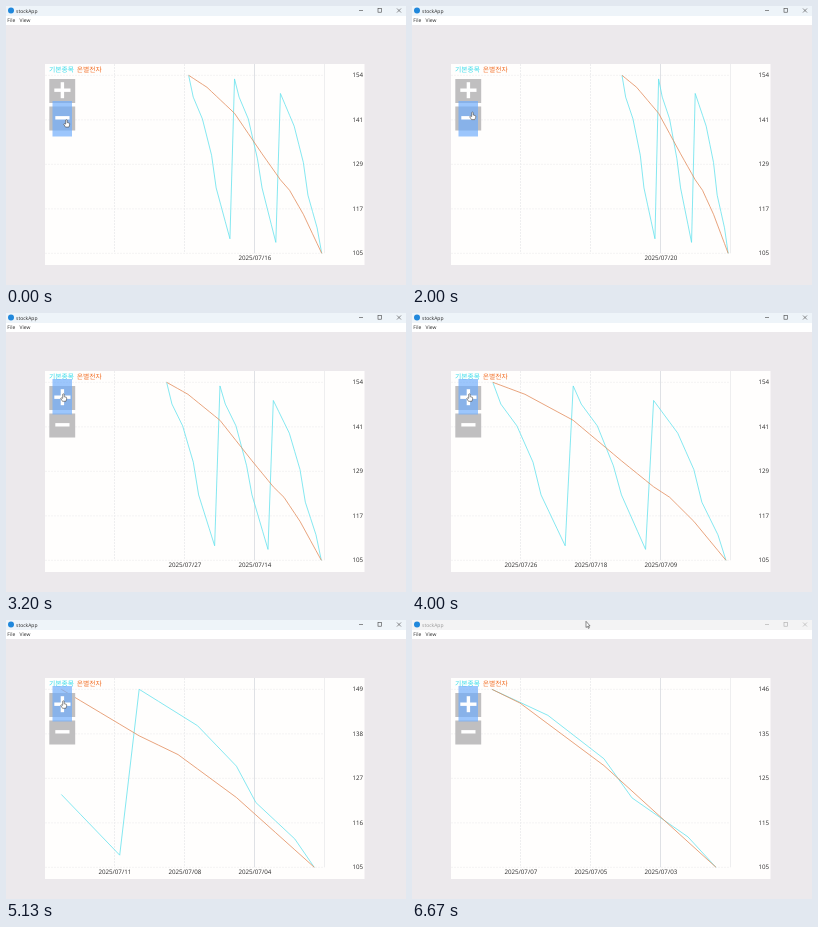
Animation of 400x279 px, one loop 6.8 s. Source, as an HTML page with a canvas:

```html
<!DOCTYPE html>
<html lang="ko">
<head>
<meta charset="utf-8">
<title>stockApp</title>
<style>
  html, body { margin: 0; width: 100%; height: 100%; overflow: hidden; background: #ece9ec; }
  canvas { display: block; }
</style>
</head>
<body>
<canvas id="stage" width="400" height="279"></canvas>
<script>
const ctx = document.getElementById('stage').getContext('2d');
ctx.textRendering = 'geometricPrecision';
const LOOP = 6800, DAYS = 30;
const LATIN = '"Open Sans", "Noto Sans", sans-serif';
const HANGUL = '"Noto Sans CJK KR", "Noto Sans CJK", sans-serif';
const CYAN = '#66e2ee', ORANGE = '#e38d5e', INK = '#2a2a2a';
const plot = { left: 39, right: 318, top: 69.3, bottom: 247.3, width: 279 };

const lerp = (a, b, k) => a + (b - a) * k;
const progress = (t, from, to) => Math.min(1, Math.max(0, (t - from) / (to - from)));

// One value per day, newest (July 1) first, straight between turning points [day, value]
function series(turns) {
  return Array.from({ length: DAYS }, (_, day) => {
    const next = Math.max(1, turns.findIndex(([d]) => d >= day));
    const [d0, v0] = turns[next - 1], [d1, v1] = turns[next];
    return lerp(v0, v1, (day - d0) / (d1 - d0));
  });
}
const prices = series([[0, 105], [1, 112], [3, 121], [4, 130], [6, 140], [9, 149],
  [10, 108], [13, 123], [14, 131], [16, 142], [18, 148], [19, 153],
  [20, 109], [23, 123], [24, 132], [26, 142], [28, 148], [29, 154]]);
const rival = series([[0, 0], [4, 39], [7, 63], [9, 73.5], [13, 99.5], [19, 140], [25, 166], [29, 178]]);

// Bursts of evenly spaced clicks on a zoom button, each ending at a number of visible days
const bursts = [
  { start: 200, gap: 234, clicks: 3, days: 76.2 },
  { start: 2330, gap: 217, clicks: 5, days: 52.3 },
  { start: 3330, gap: 180, clicks: 4, days: 34.7 },
  { start: 4130, gap: 400, clicks: 2, days: 26.6 },
  { start: 4800, gap: 165, clicks: 3, days: 14.34 },
  { start: 5400, gap: 1, clicks: 1, days: 9.96 },
];

function visibleDays(t) {
  let days = 60.8;
  for (const b of bursts) {
    if (t < b.start) break;
    const done = Math.min(b.clicks, Math.floor((t - b.start) / b.gap) + 1);
    days = lerp(days, b.days, done / b.clicks);
  }
  return days;
}

function rect(x, y, w, h, color) {
  ctx.fillStyle = color;
  ctx.fillRect(x, y, w, h);
}

function path(points, color, width = 1, dash = []) {
  ctx.beginPath();
  points.forEach(([x, y]) => ctx.lineTo(x, y));
  ctx.strokeStyle = color;
  ctx.lineWidth = width;
  ctx.setLineDash(dash);
  ctx.stroke();
}

function text(str, x, y, size, color, align = 'left', family = LATIN) {
  ctx.font = `${size}px ${family}`;
  ctx.textAlign = align;
  ctx.fillStyle = color;
  ctx.fillText(str, x, y);
}

function drawWindow(active) {
  const ink = active ? '#444' : '#aaa';
  rect(0, 0, 400, 279, '#ece9ec');
  rect(0, 0, 400, 10, active ? '#eef4f9' : '#f3f3f4');
  rect(0, 10, 400, 9, '#fff');
  ctx.beginPath();
  ctx.arc(5, 4.6, 3, 0, 7);
  ctx.fillStyle = '#2088dc';
  ctx.fill();
  text('stockApp', 10, 6.5, 5, active ? INK : '#999');
  text('File', 1.3, 16.3, 5, INK);
  text('View', 13.6, 16.3, 5, INK);
  path([[353, 4.5], [357, 4.5]], ink, .6);
  ctx.strokeRect(372, 2.6, 3.6, 3.6);
  path([[391, 2.5], [395, 6.5]], ink, .6);
  path([[395, 2.5], [391, 6.5]], ink, .6);
}

function drawSeries(values, step, color) {
  const min = Math.min(...values), max = Math.max(...values);
  path(values.map((v, i) => [
    plot.right - step * (i + .5),
    lerp(plot.bottom, plot.top, (v - min) / (max - min))
  ]), color, .8);
}

function drawChart(days) {
  const step = plot.width / days, count = Math.floor(days);
  const shown = prices.slice(0, count);
  const min = Math.min(...shown), max = Math.max(...shown);

  rect(39, 58, 319.5, 201, '#fffefd');
  for (let k = 0; k < 5; k++) {
    const y = lerp(plot.bottom, plot.top, k / 4);
    path([[plot.left, y], [plot.right, y]], '#f1f1f1', .8, [2, 1]);
    text(Math.floor(lerp(min, max, k / 4)), 357, y + 2, 6.2, INK, 'right');
  }
  for (let k = 0; k < 4; k++) {
    const x = Math.floor(plot.right - k * plot.width / 4) + .5;
    path([[x, 58], [x, plot.bottom]], k === 1 ? '#dcdee3' : '#ececee', .9, k < 2 ? [] : [2, 1]);
    const day = Math.floor(k * count / 4);
    if (k && day < DAYS)
      text(`2025/07/${String(day + 1).padStart(2, '0')}`, x + .3, 254.4, 6.2, INK, 'center');
  }
  drawSeries(shown, step, CYAN);
  drawSeries(rival.slice(0, count), step, ORANGE);
  text('기본종목', 43, 65.8, 6.8, '#35dcea', 'left', HANGUL);
  text('온별전자', 70.8, 65.8, 6.8, '#f2732c', 'left', HANGUL);
}

function drawButtons(plusSelected) {
  rect(43.3, 73, 25.9, 24, '#c0bfc0');
  rect(43.3, 100.5, 25.9, 24, '#c0bfc0');
  rect(46.5, plusSelected ? 66 : 95, 19.5, 35.5, 'rgba(110, 173, 252, .68)');
  path([[48.3, 84.2], [64.5, 84.2]], '#fff', 3.4);
  path([[56.4, 76.2], [56.4, 92.2]], '#fff', 3.4);
  path([[49.3, 111.8], [63.5, 111.8]], '#fff', 3.4);
}

function drawCursor(x, y, hand) {
  const shape = new Path2D(hand
    ? 'M-.8-3.5Q0-4.3 .7-3.5V-1L2.8-.4Q3.4 0 3.1 1.5L2.4 3.6H-1L-2.8 .7Q-2.6-.2-.8 .6Z'
    : 'M-1.5-3V3.2L-.1 2 .9 4.1 1.8 3.7 .9 1.7H2.6Z');
  ctx.save();
  ctx.translate(x, y);
  ctx.fillStyle = '#fff';
  ctx.strokeStyle = '#444';
  ctx.lineWidth = .6;
  ctx.setLineDash([]);
  ctx.fill(shape);
  ctx.stroke(shape);
  ctx.restore();
}

function drawPointer(t) {
  if (t < 2270) {
    drawCursor(60.5, lerp(117.5, 110, progress(t, 700, 1130)), true);
  } else {
    const k = progress(t, 6000, 6600);
    drawCursor(lerp(57.5, 175.5, k), lerp(84.7, 4.3, k), k < .1);
  }
}

const start = performance.now();
function tick() {
  const t = (performance.now() - start) % LOOP;
  drawWindow(t < 6530);
  drawChart(visibleDays(t));
  drawButtons(t >= 2270);
  drawPointer(t);
  requestAnimationFrame(tick);
}
tick();
</script>
</body>
</html>
```
